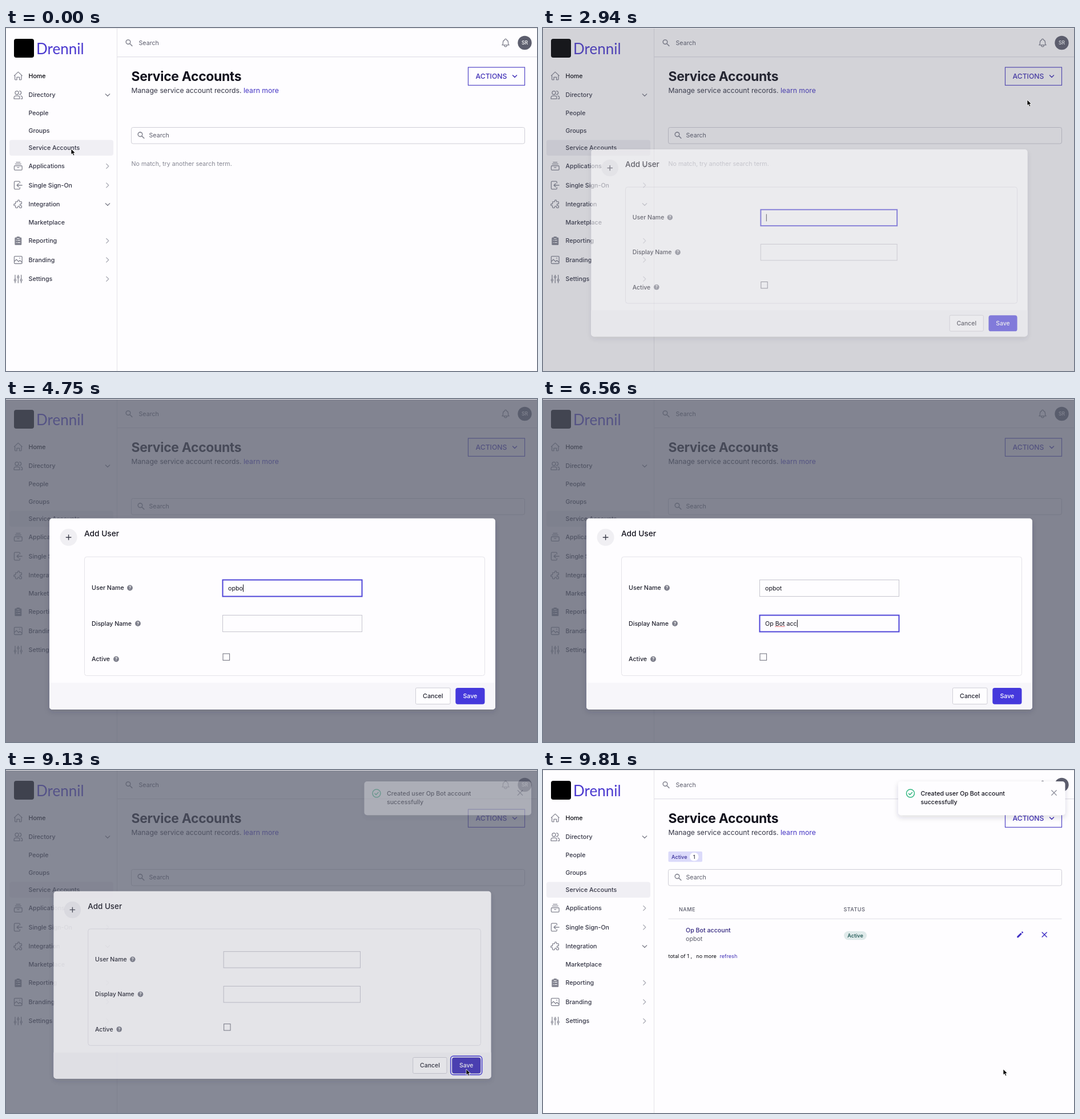
An HTML page that plays this animation: 930 by 602 pixels, repeating every 9.87 s.

```html
<!DOCTYPE html>
<html lang="en">
<head>
<meta charset="utf-8">
<title>Service Accounts</title>
<style>
  html, body { margin: 0; width: 100%; height: 100%; overflow: hidden; background: #fefdff; }
  svg { display: block; width: 930px; height: 602px; }
  text { font: 400 10.67px Inter, sans-serif; fill: #343545; white-space: pre; }
  .m { font-weight: 500; }
  .s { font-size: 9.14px; }
  .icon { fill: none; stroke: #858692; stroke-width: 1.7; stroke-linecap: round; stroke-linejoin: round; }
  .line { fill: none; stroke-linecap: round; stroke-linejoin: round; }
</style>
</head>
<body>
<svg id="stage" viewBox="0 0 930 602">
  <defs>
    <filter id="shadow" x="-10%" y="-20%" width="120%" height="150%">
      <feDropShadow dx="0" dy="4" stdDeviation="5" flood-color="#20203a" flood-opacity=".16"/>
    </filter>
    <path id="lens" d="M8 4a4 4 0 100 8 4 4 0 000-8zM2 8a6 6 0 1110.89 3.476l4.817 4.817a1 1 0 01-1.414 1.414l-4.816-4.816A6 6 0 012 8z" fill="#858692"/>
  </defs>
  <rect width="930" height="602" fill="#fefdff"/>
  <g id="side"></g>
  <g id="main"></g>
  <rect id="shade" width="930" height="602" fill="#585c6d"/>
  <g id="modal"></g>
  <g id="toast"></g>
  <g id="cursor">
    <path id="arrow" d="M0 0v10.2l2.3-2.1 1.7 3.8 1.9-.8-1.7-3.7h3.2z" fill="#000" stroke="#fff" stroke-width=".8"/>
    <path id="hand" d="M-1 1.2C-1-.4 1-.4 1.2 1.1L1.6 4.4C2.4 3.6 3.3 4 3.5 4.8 4.3 4.2 5 4.6 5.2 5.4 6.1 5 6.7 5.6 6.6 6.6L6.3 9.2 5.3 12H.2L-2.9 8C-3.6 6.9-2.4 6.1-1.5 7L-.5 8z" fill="#fff" stroke="#000" stroke-width=".9"/>
  </g>
  <rect width="930" height="1" fill="#e6e5ea"/>
</svg>
<script>
const LOOP = 9870;
const USER = 'opbot', DISPLAY = 'Op Bot account';
const USER_KEYS = [4060, 4220, 4400, 4600, 4780];
const DISPLAY_KEYS = [5060, 5180, 5280, 5380, 5750, 5940, 6080, 6260, 6380, 6560, 6680, 6800, 6920, 7060];
const TAB = 4940, TICK = 7800, SAVE = 8850, RESET = 9070, LISTED = 9380;
// time, x, y of the pointer
const PATH = [[0, 114, 212], [120, 114, 212], [1000, 850, 87], [1600, 850, 87], [2200, 848, 126],
  [3100, 848, 126], [3800, 640, 440], [7100, 640, 440], [7650, 386, 454], [8000, 386, 454],
  [8420, 793, 525.5], [8950, 793, 525.5], [9120, 806, 525], [LOOP, 806, 525]];

const $ = id => document.getElementById(id);
const text = (x, y, s, attrs = '') => `<text x="${x}" y="${y}" ${attrs}>${s}</text>`;
const rect = (x, y, w, h, r, attrs) => `<rect x="${x}" y="${y}" width="${w}" height="${h}" rx="${r}" ${attrs}/>`;
const stroke = (d, color, w = 1.3) => `<path class="line" d="${d}" stroke="${color}" stroke-width="${w}"/>`;
const icon = (x, y, d) => `<path class="icon" transform="translate(${x - 9.14} ${y - 9.14}) scale(.762)" d="${d}"/>`;
const lens = (x, y) => `<use href="#lens" transform="translate(${x - 7.6} ${y - 7.6}) scale(.762)"/>`;
const cross = (x, y, r, color, w) => stroke(`M${x - r} ${y - r}l${2 * r} ${2 * r}m0 ${-2 * r}l${-2 * r} ${2 * r}`, color, w);

const ICONS = {
  home: 'M3 11.5 12 3l9 8.5M4.500 10.500V20a1 1 0 001 1H9v-6h6v6h3.500a1 1 0 001-1v-9.500',
  people: 'M9 3a4 4 0 110 8 4 4 0 010-8zM2.500 21v-3a4 4 0 014-4h5a4 4 0 014 4v3zM15 3a4 4 0 110 8M18 14a4 4 0 013.500 4v3h-3',
  stack: 'M7.500 3h9M5.500 7h13M5 11h14a2 2 0 012 2v6a2 2 0 01-2 2H5a2 2 0 01-2-2v-6a2 2 0 012-2zM10 15h4',
  enter: 'M16 7V5a2 2 0 00-2-2H5a2 2 0 00-2 2v14a2 2 0 002 2h9a2 2 0 002-2v-2M21 12H9m4-4-4 4 4 4',
  puzzle: 'M11 4a2 2 0 114 0v1a1 1 0 001 1h3a1 1 0 011 1v3a1 1 0 01-1 1h-1a2 2 0 100 4h1a1 1 0 011 1v3a1 1 0 01-1 1h-3a1 1 0 01-1-1v-1a2 2 0 10-4 0v1a1 1 0 01-1 1H7a1 1 0 01-1-1v-3a1 1 0 00-1-1H4a2 2 0 110-4h1a1 1 0 001-1V7a1 1 0 011-1h3a1 1 0 001-1V4z',
  image: 'M5 3.500h14a2 2 0 012 2v13a2 2 0 01-2 2H5a2 2 0 01-2-2v-13a2 2 0 012-2zM3 16l5-5 5 5 3-3 5 5M15 8h1',
  sliders: 'M5 3v9m0 5v4M3 14.500a2 2 0 104 0 2 2 0 10-4 0M12 3v2m0 5v11M10 7.500a2 2 0 104 0 2 2 0 10-4 0M19 3v9m0 5v4M17 14.500a2 2 0 104 0 2 2 0 10-4 0',
  bell: 'M15 17h5l-1.405-1.405A2.032 2.032 0 0118 14.158V11a6.002 6.002 0 00-4-5.659V5a2 2 0 10-4 0v.341C7.670 6.165 6 8.388 6 11v3.159c0 .538-.214 1.055-.595 1.436L4 17h5m6 0v1a3 3 0 11-6 0v-1m6 0H9'
};

// label, centre y, icon, chevron
const MENU = [['Home', 84, 'home'], ['Directory', 117.5, 'people', 'down'], ['People', 149.5], ['Groups', 180],
  ['Service Accounts', 210.5], ['Applications', 242.5, 'stack', 'right'], ['Single Sign-On', 276, 'enter', 'right'],
  ['Integration', 309.5, 'puzzle', 'down'], ['Marketplace', 341.5], ['Reporting', 373.5, 'clip', 'right'],
  ['Branding', 407, 'image', 'right'], ['Settings', 440.5, 'sliders', 'right']];

const clipboard = y => rect(15.3, y - 6, 12, 13.5, 1.5, 'fill="#858692"') + rect(18.6, y - 7.5, 5.4, 3, 1, 'fill="#858692"') +
  stroke(`M18 ${y - 1}h.5m2 0h4M18 ${y + 3}h.5m2 0h4M19.500 ${y - 4}h3.600`, '#fefdff', 1.1);

$('side').innerHTML =
  rect(194, 0, 1, 602, 0, 'fill="#e3e2e8"') +
  rect(14, 19, 35, 33, 4, 'fill="#000"') +
  text(53, 46, 'Drennil', 'style="font:400 26px Lato,sans-serif;fill:#4a38cf"') +
  rect(6, 196.5, 182, 27.5, 4, 'fill="#f0eff4"') +
  MENU.map(([label, y, name, chevron]) =>
    text(39.5, y + 3.9, label, `class="m" ${label === 'Home' ? 'style="fill:#08080f"' : ''}`) +
    (name === 'clip' ? clipboard(y) : name ? icon(21.3, y, ICONS[name]) : '') +
    (chevron === 'down' ? stroke(`M174.200 ${y - 1.7}l3.800 3.700 3.800-3.700`, '#7a7b88', 1.2) : '') +
    (chevron === 'right' ? stroke(`M175.800 ${y - 4}l4 4-4 4`, '#aaabb5', 1.2) : '')).join('');

$('main').innerHTML =
  rect(195, 50, 735, 1, 0, 'fill="#e2e1e7"') + rect(195, 51, 735, 1, 0, 'fill="#f6f5f9"') +
  lens(215.5, 26) + text(232.5, 30.3, 'Search', 'style="fill:#5b5c6b"') +
  icon(875, 26, ICONS.bell) + '<circle cx="908.500" cy="26" r="12.200" fill="#5d5e6e"/>' +
  text(908.5, 29, 'SR', 'class="m" text-anchor="middle" style="font-size:8.600px;fill:#fff"') +
  text(219.5, 93, 'Service Accounts', 'style="font-size:22.860px;font-weight:700;letter-spacing:-.3px;fill:#12121d"') +
  text(219.5, 114.4, 'Manage service account records. <tspan fill="#4535c4">learn more</tspan>', 'style="font-size:12.190px"') +
  rect(809.5, 69, 99, 31.5, 0, 'fill="#fefdff" stroke="#5245c6" stroke-width="1.200"') +
  rect(807, 66.5, 104, 36.5, 1, 'id="ring" fill="none" stroke="#7a70e4" stroke-width="1.500"') +
  text(822.5, 89.3, 'ACTIONS', 'class="m" style="font-size:12.190px;fill:#4030b6"') +
  stroke('M887.500 83l3.500 3.500 3.500-3.500', '#4030b6', 1.5) +
  rect(219.5, 174.5, 689, 28.5, 3, 'fill="#fefdff" stroke="#cfced6"') +
  lens(236.5, 188.2) + text(250.5, 192.2, 'Search', 'style="fill:#5b5c6b"') +
  `<g id="empty">${text(219.5, 241.8, 'No match, try another search term.', 'style="fill:#858692"')}</g>` +
  '<g id="table">' +
    rect(219.5, 143, 59.5, 18.3, 2, 'fill="#dbdafa"') + text(225, 155.5, 'Active', 'class="m s" style="fill:#3a309a"') +
    rect(257, 145, 15.5, 14.5, 7, 'fill="#fefdff"') + text(264.7, 155.5, '1', 'class="m s" text-anchor="middle"') +
    text(238, 248.3, 'NAME', 'class="m s" style="letter-spacing:.4px;fill:#5b5c6b"') +
    text(526.5, 248.3, 'STATUS', 'class="m s" style="letter-spacing:.4px;fill:#5b5c6b"') +
    rect(219.5, 260.7, 689, 1, 0, 'fill="#dfdee4"') +
    text(250, 285.3, DISPLAY, 'class="m" style="fill:#33277f"') +
    text(250, 300.2, USER, 'style="fill:#5b5c6b"') +
    rect(527, 283, 40, 15.2, 7.6, 'fill="#dfeaea"') + text(547, 293.6, 'Active', 'class="m s" text-anchor="middle" style="fill:#134e4a"') +
    '<path transform="translate(828 281.300) scale(.762)" fill="#4030c4" d="M13.586 3.586a2 2 0 112.828 2.828l-.793.793-2.828-2.828.793-.793zM11.379 5.793L3 14.172V17h2.828l8.380-8.379-2.830-2.828z"/>' +
    cross(878.2, 289, 4, '#4030c4', 1.5) +
    text(219.5, 330, 'total of 1 ,', 'class="s" style="fill:#08080f"') + text(268.3, 330, 'no more', 'class="s" style="fill:#08080f"') +
    text(309.5, 330, 'refresh', 'class="s" style="fill:#4030b6"') +
  '</g>';

const field = (id, y) => rect(379.5, y, 244, 29, 0, `id="${id}Box" fill="#fefdff"`) +
  text(389, y + 18.2, '', `id="${id}" style="fill:#12121d"`);
const label = (y, s, helpX) => text(150, y + 3.9, s, 'class="m" style="fill:#20212e"') +
  `<circle cx="${helpX}" cy="${y}" r="4.900" fill="#7d7e8b"/>` +
  text(helpX, y + 2.7, '?', 'text-anchor="middle" style="font-size:7.500px;font-weight:700;fill:#fff"');

$('modal').innerHTML =
  rect(76, 209.5, 781, 335.5, 5, 'fill="#fefdff" filter="url(#shadow)"') +
  '<path d="M76 498h781v42a5 5 0 01-5 5H81a5 5 0 01-5-5z" fill="#f7f6fa"/>' +
  '<circle cx="109.600" cy="242.800" r="15" fill="#f0eff3"/>' + stroke('M105.300 242.800h8.600m-4.300-4.300v8.600', '#3c3d4b', 1.4) +
  text(137, 241.4, 'Add User', 'class="m" style="font-size:13.710px;fill:#12121d"') +
  rect(137.5, 277, 701, 208.5, 4, 'fill="none" stroke="#e4e3e9"') +
  label(331.5, 'User Name', 217) + label(394, 'Display Name', 231) + label(456.5, 'Active', 193) +
  field('user', 317.5) + field('display', 379.5) +
  '<path id="typo" fill="none" stroke="#e5383b" stroke-width="1.300" stroke-dasharray="1.300 1"/>' +
  rect(0, 0, 1, 13, 0, 'id="caret" fill="#12121d"') +
  rect(380, 447, 11.6, 11.6, 0, 'fill="#fefdff" stroke="#6d6e7b"') +
  `<g id="tick">${rect(379.5, 446.3, 12.6, 12.6, 0, 'fill="#4052e0"') + stroke('M383 452.800l2 2 4-4', '#fff', 1.6)}</g>` +
  rect(377.5, 444.3, 16.7, 16.7, 0, 'id="tickRing" fill="none" stroke="#4052e0" stroke-width="1.600"') +
  rect(717.5, 507, 60.5, 28.5, 2, 'fill="#fefdff" stroke="#cfced6"') +
  text(747.8, 525.2, 'Cancel', 'class="m" text-anchor="middle" style="fill:#20212e"') +
  rect(784.8, 504.5, 56, 33.5, 5, 'id="saveRing" fill="#fff" stroke="#4539dc" stroke-width="1.700"') +
  rect(787.3, 507, 51.2, 28.7, 4, 'id="save"') +
  text(812.9, 525.2, 'Save', 'class="m" text-anchor="middle" style="fill:#fff"');

$('toast').innerHTML =
  rect(622, 20, 292.5, 59.3, 5, 'fill="#fefdff" filter="url(#shadow)"') +
  '<circle cx="643.500" cy="41" r="7" fill="none" stroke="#35b883" stroke-width="1.500"/>' +
  stroke('M640.500 41.300l2.100 2.100 4-4.200', '#35b883', 1.5) +
  text(661.5, 45, `Created user ${DISPLAY}`, 'class="m" style="fill:#12121d"') +
  text(661.5, 60.3, 'successfully', 'class="m" style="fill:#12121d"') + cross(895, 40, 4.2, '#8f909c', 1.3);

const clamp = v => Math.min(1, Math.max(0, v));
const easeOut = (t, start, length) => 1 - (1 - clamp((t - start) / length)) ** 3;
const easeIn = (t, start, length) => clamp((t - start) / length) ** 2;
const within = (t, from, to) => t >= from && t < to;
const show = (id, on) => $(id).setAttribute('visibility', on ? 'inherit' : 'hidden');
const typed = (s, keys, t) => s.slice(0, keys.filter(k => k <= t).length);

function pointer(t) {
  const i = PATH.findIndex(p => p[0] > t), [t0, x0, y0] = PATH[i - 1], [t1, x1, y1] = PATH[i];
  const u = (t - t0) / (t1 - t0), e = u * u * (3 - 2 * u);
  return [x0 + (x1 - x0) * e, y0 + (y1 - y0) * e];
}

function drawForm(t) {
  const filled = t < RESET;
  $('user').textContent = filled ? typed(USER, USER_KEYS, t) : '';
  $('display').textContent = filled ? typed(DISPLAY, DISPLAY_KEYS, t) : '';
  const focus = t < TAB ? 'user' : t < TICK ? 'display' : '';
  for (const id of ['user', 'display']) {
    $(id + 'Box').setAttribute('stroke', id === focus ? '#4f45d8' : '#c9c8d1');
    $(id + 'Box').setAttribute('stroke-width', id === focus ? 2 : 1.1);
  }
  show('caret', focus);
  if (focus) {
    const el = $(focus), w = el.textContent ? el.getComputedTextLength() : 0;
    $('caret').setAttribute('x', 389.2 + w);
    $('caret').setAttribute('y', focus === 'user' ? 325.5 : 387.5);
  }
  const misspelt = within(t, DISPLAY_KEYS[6], TICK);
  show('typo', misspelt);
  if (misspelt) {
    const start = $('display').getSubStringLength(0, 3), w = $('display').getSubStringLength(3, 3);
    $('typo').setAttribute('d', `M${389 + start} 399.300h${w}`);
  }
  show('tick', within(t, TICK, RESET));
  show('tickRing', within(t, TICK, SAVE));
  show('saveRing', t >= SAVE);
  $('save').setAttribute('fill', t >= 8350 ? '#3b2cb8' : '#4539dc');
}

function draw(t) {
  const closing = 1 - easeIn(t, 9070, 132);
  const alpha = easeOut(t, 2904, 150) * closing;
  const scale = t < 5000 ? .95 + .05 * alpha : .95 + .05 * closing ** 2;
  $('modal').setAttribute('opacity', alpha);
  $('modal').setAttribute('transform', `translate(466.500 377.200) scale(${scale}) translate(-466.500 -377.200)`);
  show('modal', alpha > 0);
  $('shade').setAttribute('opacity', .75 * easeOut(t, 2903, 284) * (1 - easeIn(t, 9090, 200)));
  drawForm(t);

  show('ring', within(t, 1300, 2000));
  show('empty', t < 9090);
  show('table', t >= LISTED);

  const slide = easeOut(t, 9095, 300);
  show('toast', slide > 0);
  $('toast').setAttribute('opacity', slide);
  $('toast').setAttribute('transform', `translate(${8 * (1 - slide)} 0)`);

  const [x, y] = pointer(t), press = within(t, 960, 1750) && y < 101 || within(t, 8390, 9080);
  $('cursor').setAttribute('transform', `translate(${x} ${y})`);
  show('cursor', !within(t, 4060, 7100));
  show('hand', press);
  show('arrow', !press);
}

const begin = performance.now();
(function tick() {
  draw((performance.now() - begin) % LOOP);
  requestAnimationFrame(tick);
})();
</script>
</body>
</html>
```
